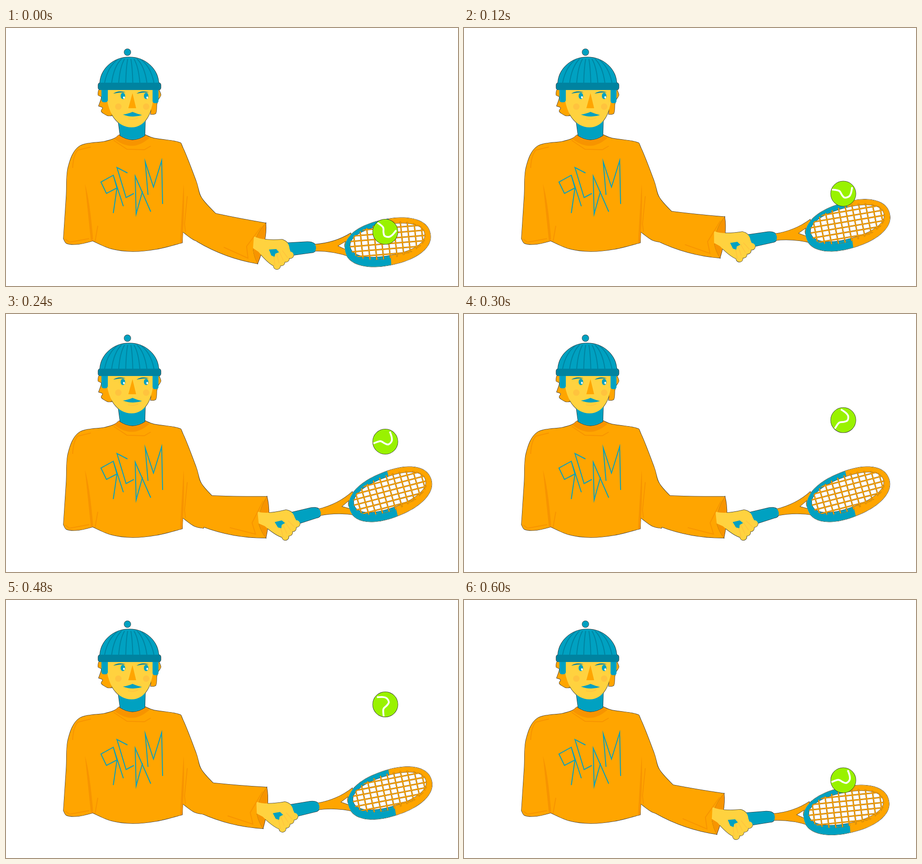
Animation of 990x566 px, one loop 630 ms. Source, as an HTML page with a canvas:

```html
<!DOCTYPE html>
<html lang="en">
<head>
<meta charset="utf-8">
<title>Tennis bounce</title>
<style>
html, body { margin: 0; width: 100%; height: 100%; overflow: hidden; background: #fff; }
canvas { display: block; width: 990px; height: 566px; }
</style>
</head>
<body>
<canvas id="stage" width="990" height="566"></canvas>
<script>
const ctx = document.getElementById('stage').getContext('2d');
const LOOP = 630, STEP = 30;
const ORANGE = '#ffa500', RUST = '#f79400', YELLOW = '#ffd23f', PEACH = '#ffc33e',
      BLUE = '#00a1c1', TEAL = '#0083a0', LIME = '#99f200', INK = '#2b2b2b';
const ELBOW = { x: 413, y: 400 }, SWING = -Math.PI / 18;

const shape = d => new Path2D(d);

// Smooth curve through "x,y" points; "|" makes the point before it a corner.
function spline(text) {
  const path = new Path2D();
  let last = null;
  for (const part of text.split('|')) {
    const pts = part.trim().split(/\s+/).map(p => p.split(',').map(Number));
    if (last) pts.unshift(last);
    else path.moveTo(...pts[0]);
    for (let i = 0; i < pts.length - 1; i++) {
      const a = pts[i - 1] || pts[i], b = pts[i], c = pts[i + 1], d = pts[i + 2] || c;
      path.bezierCurveTo(b[0] + (c[0] - a[0]) / 6, b[1] + (c[1] - a[1]) / 6,
        c[0] - (d[0] - b[0]) / 6, c[1] - (d[1] - b[1]) / 6, c[0], c[1]);
    }
    last = pts[pts.length - 1];
  }
  return path;
}

function ellipse(x, y, rx, ry = rx) {
  const path = new Path2D();
  path.ellipse(x, y, rx, ry, 0, 0, Math.PI * 2);
  return path;
}

// Tilted superellipse, slightly squarer than an ellipse.
function oval(x, y, a, b, tilt) {
  const path = new Path2D();
  const bend = v => Math.sign(v) * Math.abs(v) ** (2 / 2.2);
  for (let i = 0; i < 120; i++) {
    const angle = i * Math.PI / 60;
    const u = a * bend(Math.cos(angle)), v = b * bend(Math.sin(angle));
    path.lineTo(x + u * Math.cos(tilt) - v * Math.sin(tilt), y + u * Math.sin(tilt) + v * Math.cos(tilt));
  }
  path.closePath();
  return path;
}

function box(x, y, w, h, r) {
  const path = new Path2D();
  path.roundRect(x, y, w, h, r);
  return path;
}

function fill(path, color, rule = 'nonzero') {
  ctx.fillStyle = color;
  ctx.fill(path, rule);
}
function stroke(path, color, width) {
  ctx.strokeStyle = color;
  ctx.lineWidth = width;
  ctx.stroke(path);
}
const outline = (...paths) => paths.forEach(p => stroke(p, INK, 1.5));

// Sweater
const body = spline(`247,235 | 238,242 216,249 160,260 136,306 132,370 126,462 | 134,473 160,474 190,467 |
  230,484 277,490 330,485 386,471 | 387,447 | 412,465 432,470 | 459,407 | 428,372 416,335 388,264 376,250 325,242 304,234 |
  247,235`);
const creases = shape(`M146,307 Q147,280 157,268 L186,261 M130,463 L139,470 L182,462 M201,434 L195,469
  M397,369 L391,430 L393,447 M235,246 L265,266 L303,267 L317,259`);
const folds = shape('M173,342 Q184,380 191,467 L186,468 Z M389,342 Q392,390 386,471 L381,472 Z');
const collar = shape('M247,235 L237,243 Q277,275 314,241 L304,235 Z');
const neck = shape('M246,206 L305,203 L304,236 Q277,254 250,236 Z');
const lettering = shape(`M235,323 L208,338 L220,363 L243,351 Z L257,391 M243,351 L235,406
  M266,318 L243,306 L263,372 L280,363 M317,403 L283,325 L285,408 L299,358
  M311,366 L305,294 L323,349 L341,291 L343,386`);

// Head
const hat = shape('M205.5,124 A64.5,60 0 0 1 334.5,124 Z');
const band = box(202, 120, 137, 16, 5);
const pom = ellipse(266, 53, 7);
const face = shape('M219,130 C219,190 246,218 275,218 C303,218 324,190 324,130 Z');
const hair = [
  spline('203,136 202,147 209,152 203,171 | 212,175 209,183 222,192 232,192 | 222,136'),
  spline('335,136 339,147 334,156 330,168 | 328,187 317,189 | 322,136')
];
const sideburns = [box(209, 130, 14, 33, 5), box(321, 130, 13, 35, 5)];
const moustache = shape('M256,190 Q268,188 277,184 Q286,188 298,191 Q277,198 256,190');
const ribs = new Path2D();
for (let k = -1; k <= 1.01; k += 2 / 7) {
  ribs.moveTo(270 + 24 * k, 68);
  ribs.quadraticCurveTo(270 + 47 * k, 84, 270 + 54 * k, 120);
}

// Arm
const sleeve = shape(`M440,403 L459,407 Q510,418 569,428 Q546,452 541,485 Q543,503 551,517
  Q480,505 418,468 L405,455 L410,410 Z`);
const cuff = shape('M569,428 Q572,465 551,517 Q543,503 541,485 Q546,452 569,428 Z');
const sleeveLines = shape('M477,481 L530,505 L527,479 L559,436');
const hand = shape('M543,457 Q562,467 605,464 Q620,469 621,484 L625,496 L596,524 Q582,526 553,491 L541,483 Z');
const fingers = new Path2D();
for (let i = 0; i < 4; i++) {
  hand.addPath(ellipse(622.5 - 9.7 * i, 498 + 8 * i, 7.5));
  fingers.moveTo(605 - 6 * i, 488 + 4 * i);
  fingers.lineTo(617 - 9.5 * i, 504 + 6 * i);
}
const palm = shape('M576,486 L592,485 L598,492 L590,495 L588,502 L581,499 Z');

// Racket
const handle = shape('M606,472 L660,469 Q679,469 679,482 Q679,493 668,493 L610,501 Z');
const shaft = shape('M674,475 Q720,472 755,450 L755,502 Q715,488 674,489 Z');
const gap = shape('M727,478 L744,468 Q739,477 744,486 Z');
const rim = oval(836, 470, 95, 50, -0.21);
const hole = oval(835.5, 465.5, 82.7, 33.8, -0.18);
const stringArea = oval(836, 466.5, 84, 39, -0.18);
const ring = new Path2D(rim);
ring.addPath(hole);
const strings = new Path2D();
for (let x = 758; x < 920; x += 15) {
  strings.moveTo(x, 420);
  strings.lineTo(x + 10, 515);
}
for (let y = 446; y < 530; y += 11.5) {
  strings.moveTo(745, y);
  strings.lineTo(930, y - 15);
}

const seam = spline('-26,4 -11,-1 -1,4 7,6 14,-1 14,-10 10,-22');

function drawRacket() {
  fill(shaft, ORANGE);
  fill(gap, '#fff');
  stroke(gap, INK, 0.8);
  fill(handle, BLUE);
  fill(rim, '#fff');
  fill(ring, ORANGE, 'evenodd');
  ctx.save();
  ctx.clip(shape('M730,400 L837,400 L845,540 L730,540 Z'));
  fill(ring, BLUE, 'evenodd');
  ctx.restore();
  stroke(hole, INK, 0.6);
  ctx.save();
  ctx.clip(stringArea);
  stroke(strings, '#8a5a1c', 3);
  stroke(strings, ORANGE, 2);
  ctx.restore();
}

function drawArm() {
  outline(shaft, handle, rim, hand, cuff, sleeve);
  drawRacket();
  fill(sleeve, ORANGE);
  fill(cuff, RUST);
  fill(hand, YELLOW);
  stroke(fingers, PEACH, 1.5);
  fill(palm, BLUE);
  stroke(sleeveLines, RUST, 2);
}

function drawSweater() {
  fill(body, ORANGE);
  fill(folds, RUST);
  stroke(creases, RUST, 2);
  fill(collar, RUST);
  stroke(lettering, BLUE, 2);
}

function drawEye(x, gaze) {
  fill(shape(`M${x - 21},144 Q${x - 10},136 ${x + 6},141 Q${x - 8},141 ${x - 21},144`), TEAL);
  fill(ellipse(x, 149, 5, 7), BLUE);
  fill(ellipse(x + 2.3, gaze, 1.9, 2.6), '#fff');
}

function drawHead(gaze) {
  outline(neck, ...hair, face, pom, hat, band);
  fill(neck, BLUE);
  hair.forEach(p => fill(p, ORANGE));
  fill(face, YELLOW);
  sideburns.forEach(p => fill(p, BLUE));
  for (const x of [246, 307]) fill(ellipse(x, 172.5, 7), PEACH);
  for (const x of [256, 307]) drawEye(x, gaze);
  fill(shape('M277,143 L285,176 L268,176 Z'), ORANGE);
  fill(moustache, BLUE);
  stroke(shape('M267,199 Q278,203 290,197'), PEACH, 1.8);
  fill(pom, BLUE);
  fill(hat, BLUE);
  stroke(ribs, TEAL, 2);
  fill(band, TEAL);
}

function drawBall(y, turn) {
  const disc = ellipse(0, 0, 27.3);
  ctx.save();
  ctx.translate(830.7, y);
  outline(disc);
  fill(disc, LIME);
  ctx.clip(disc);
  ctx.rotate(turn * Math.PI / 180);
  stroke(seam, '#fff', 4);
  ctx.restore();
}

// Linear interpolation between [time, value] keys.
function track(keys, t) {
  const i = Math.max(1, keys.findIndex(k => k[0] >= t));
  const [t0, v0] = keys[i - 1], [t1, v1] = keys[i];
  return v0 + (v1 - v0) * (t - t0) / (t1 - t0);
}
const armLift = t => Math.min(1, t / 240, (LOOP - t) / 240);
const ballY = [[0, 447], [240, 280], [390, 162], [420, 146], [LOOP, 437]];
const ballTurn = [[0, 58], [240, 0], [420, -110], [LOOP, 18]];

function draw(now) {
  const t = Math.floor(now % LOOP / STEP) * STEP;
  const y = track(ballY, t);
  ctx.fillStyle = '#fff';
  ctx.fillRect(0, 0, 990, 566);
  outline(body);
  ctx.save();
  ctx.translate(ELBOW.x, ELBOW.y);
  ctx.rotate(SWING * armLift(t));
  ctx.translate(-ELBOW.x, -ELBOW.y);
  drawArm();
  ctx.restore();
  drawSweater();
  drawHead(150.5 + (y - 146) / 150);
  drawBall(y, track(ballTurn, t));
}

const start = performance.now();
function tick() {
  draw(performance.now() - start);
  requestAnimationFrame(tick);
}
tick();
</script>
</body>
</html>
```
